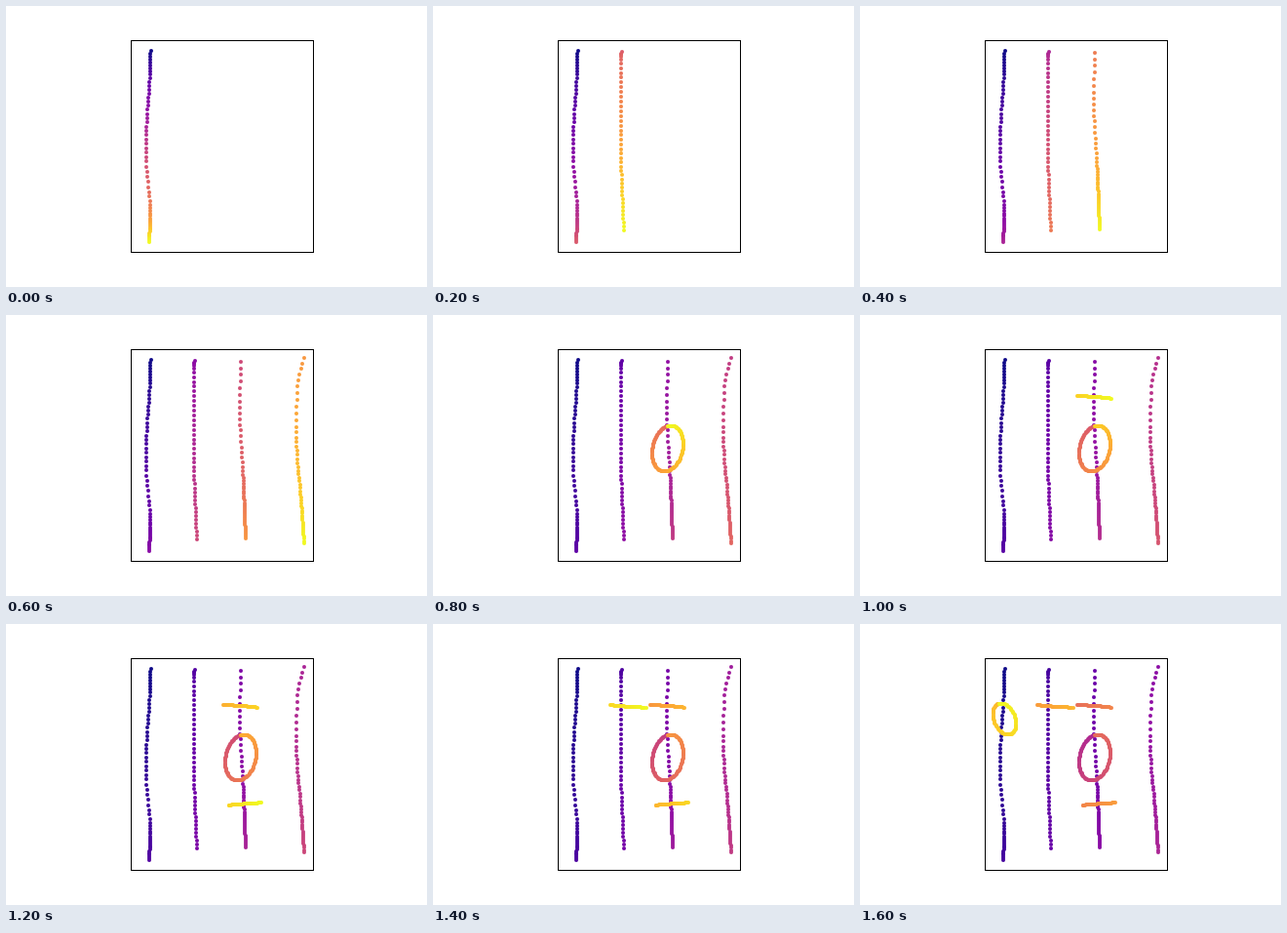
Recreate the animation shown at these times as an HTML page with a canvas. Size 432x288 px, loop 1800 ms.

```html
<!DOCTYPE html>
<html>
<head>
<meta charset="utf-8">
<style>
  html, body { margin: 0; width: 100%; height: 100%; overflow: hidden; background: #fff; }
  canvas { display: block; }
</style>
</head>
<body>
<canvas id="stage" width="432" height="288"></canvas>
<script>
const ctx = document.getElementById('stage').getContext('2d');
const STEP_MS = 200, DOT_RADIUS = 2;

const plasma = ['0d0887', '41049d', '6a00a8', '8f0da4', 'b12a90', 'cc4778',
                'e16462', 'f2844b', 'fca636', 'fcce25', 'f0f921']
  .map(hex => [0, 2, 4].map(i => parseInt(hex.slice(i, i + 2), 16)));

function colour(u) {
  const s = u * (plasma.length - 1), i = Math.min(plasma.length - 2, Math.floor(s));
  return `rgb(${plasma[i].map((c, k) => Math.round(c + (plasma[i + 1][k] - c) * (s - i)))})`;
}

// Dots of a stroke, from a function of its progress 0..1.
const trace = (count, point) => Array.from({ length: count }, (_, i) => point(i / (count - 1)));

// Smooth curve through keys [x, y, dot number]; close keys mean a slow pen.
function line(...keys) {
  const last = keys.length - 1, total = keys[last][2];
  const slope = (i, axis) => {
    const a = keys[Math.max(0, i - 1)], b = keys[Math.min(last, i + 1)];
    return (b[axis] - a[axis]) / (b[2] - a[2]);
  };
  return trace(total + 1, progress => {
    const n = progress * total;
    const i = Math.max(0, keys.slice(1, last).filter(key => key[2] <= n).length);
    const a = keys[i], b = keys[i + 1], span = b[2] - a[2], u = (n - a[2]) / span;
    return [0, 1].map(k =>
      a[k] + (b[k] - a[k]) * u * u * (3 - 2 * u) +
      span * u * (1 - u) * (slope(i, k) * (1 - u) - slope(i + 1, k) * u));
  });
}

const bar = (x0, y0, x1, y1, bend) =>
  trace(36, u => [x0 + (x1 - x0) * u, y0 + (y1 - y0) * u ** bend]);

// Counter-clockwise loop from the top, leaning by a phase shift.
const ring = (count, cx, cy, rx, ry, lean) => trace(count, u => {
  const t = 0.2 + u * 2 * Math.PI;
  return [cx - rx * Math.sin(t - lean), cy - ry * Math.cos(t)];
});

const strokes = [
  line([148.5, 46, 0], [147.5, 74, 9], [143.7, 150, 27], [148, 207, 39], [147, 242, 56]),
  line([193.5, 47, 0], [193.2, 55, 4], [193.2, 156, 25], [196, 230, 43]),
  line([241, 48, 0], [240.3, 107, 9], [243.5, 167, 21], [246, 229, 49]),
  line([306, 44, 0], [300, 67, 4], [298, 125.5, 13], [303, 190, 30], [306, 234, 49]),
  ring(130, 241, 137, 16, 23.5, 0.2),
  bar(223, 83.3, 257.5, 85.7, 2),
  bar(228.5, 186, 262, 183.3, 0.7),
  bar(182, 82.5, 218.5, 85.7, 0.5),
  ring(85, 148.5, 97.5, 12, 16, -0.3)
].map(dots => dots.map(dot => dot.map(Math.round)));

function draw(count) {
  ctx.fillStyle = '#fff';
  ctx.fillRect(0, 0, 432, 288);
  const dots = strokes.slice(0, count).flat();
  dots.forEach(([x, y], i) => {
    ctx.fillStyle = colour(i / (dots.length - 1));
    ctx.beginPath();
    ctx.arc(x, y, DOT_RADIUS, 0, 2 * Math.PI);
    ctx.fill();
  });
  ctx.strokeStyle = '#000';
  ctx.strokeRect(128.5, 35.5, 187, 217);
}

const start = performance.now();
function tick() {
  draw(1 + Math.floor((performance.now() - start) / STEP_MS) % strokes.length);
  requestAnimationFrame(tick);
}
tick();
</script>
</body>
</html>
```
